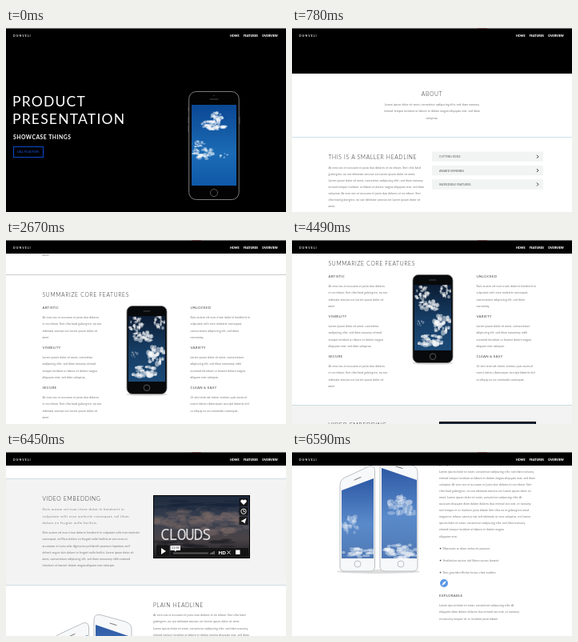
An HTML page for the animation above (8000 ms loop, 350 by 230 pixels).

```html
<!DOCTYPE html>
<html lang="en">
<head>
<meta charset="utf-8">
<title>Product presentation</title>
<style>
html, body { margin: 0; width: 100%; height: 100%; overflow: hidden; background: #fff; }
svg { display: block; width: 350px; height: 230px; }
text { font-family: Lato, "Open Sans", sans-serif; white-space: pre; }
.hero { font-size: 17.5px; letter-spacing: 1.2px; fill: #fff; }
.sub { font-size: 6.8px; font-weight: 700; letter-spacing: .5px; fill: #fff; }
.cta { font-size: 3.4px; fill: #1a5cff; }
.h2 { font-size: 6.8px; font-weight: 300; letter-spacing: .66px; fill: #222; }
.h3 { font-size: 4.4px; letter-spacing: .24px; fill: #444; }
.body { font-size: 3.5px; letter-spacing: .09px; fill: #777; }
.lead { font-size: 4.3px; letter-spacing: .34px; fill: #888; }
.item { font-size: 3.5px; letter-spacing: .1px; fill: #555; }
.mid { text-anchor: middle; }
.nav { font-size: 3.7px; font-weight: 900; fill: #fff; }
.brand { font-size: 3.6px; font-weight: 700; letter-spacing: 1px; fill: #eee; }
.title { font: 300 19.6px "Noto Sans Mono", "DejaVu Sans Mono", monospace; letter-spacing: -1.4px; fill: #ddd; }
.tiny { font-size: 3.6px; fill: #333; }
.hd { font-size: 6px; font-weight: 900; fill: #fff; }

/* the page jumps one screenful at a time, in 70 ms steps */
#page { animation: scroll 8s step-end infinite; }
@keyframes scroll {
  0% { transform: translateY(0); }
  6.25% { transform: translateY(-24px); }
  7.125% { transform: translateY(-150px); }
  8% { transform: translateY(-204px); }
  31.625% { transform: translateY(-230px); }
  32.5% { transform: translateY(-358px); }
  33.375% { transform: translateY(-408px); }
  56.125% { transform: translateY(-447px); }
  57% { transform: translateY(-570px); }
  57.875% { transform: translateY(-612px); }
  80.625% { transform: translateY(-620px); }
  81.5% { transform: translateY(-752px); }
  82.375%, 100% { transform: translateY(-816px); }
}
#tick { animation: tick 8s step-end infinite; }
@keyframes tick { 0% { opacity: 0; } 8%, 100% { opacity: 1; } }
</style>
</head>
<body>
<svg viewBox="0 0 350 230">
  <defs>
    <linearGradient id="sky" x2="0" y2="1"><stop stop-color="#0b4793"/><stop offset=".6" stop-color="#1c6bb5"/><stop offset="1" stop-color="#0f59a8"/></linearGradient>
    <linearGradient id="deep" x2="0" y2="1"><stop stop-color="#0b1c33"/><stop offset=".5" stop-color="#163c63"/><stop offset="1" stop-color="#1b4a78"/></linearGradient>
    <linearGradient id="day" x2="0" y2="1"><stop stop-color="#2c58a4"/><stop offset=".55" stop-color="#5a8aca"/><stop offset="1" stop-color="#4f78b4"/></linearGradient>
    <linearGradient id="dusk" x2="0" y2="1"><stop stop-color="#1d2a3d"/><stop offset=".4" stop-color="#3a4152"/><stop offset=".7" stop-color="#4a4345"/><stop offset="1" stop-color="#1b1c22"/></linearGradient>
    <filter id="soft" x="-20%" y="-20%" width="140%" height="140%"><feGaussianBlur stdDeviation=".5"/></filter>
    <clipPath id="c1"><rect x="232" y="96" width="56" height="101"/></clipPath>
    <clipPath id="c2"><rect x="153" y="503" width="46" height="82"/></clipPath>
    <clipPath id="c3"><path d="M62 864L102 849V949H62Z"/></clipPath>
    <clipPath id="c4"><path d="M112 836L156 851V949H112Z"/></clipPath>
    <clipPath id="c5"><rect x="185" y="675" width="119" height="77"/></clipPath>
  </defs>
  <rect width="350" height="230" fill="#fff"/>

  <g id="page">
    <rect width="350" height="261"/>
    <rect x="9.5" y="148.500" width="37" height="13" fill="none" stroke="#0d49cc"/>

    <rect x="228.7" y="79.5" width="62.5" height="135" rx="9" fill="#030303" stroke="#8a8a8a" stroke-width=".9"/>
    <path d="M228 99v5M228 111v8M228 122v8M292 111v9" stroke="#777" stroke-width=".7"/>
    <path d="M255 89h10" stroke="#444" stroke-linecap="round"/>
    <circle cx="260" cy="84.500" r=".7" fill="#444"/>
    <circle cx="260" cy="206" r="4.600" fill="none" stroke="#777" stroke-width=".7"/>
    <g clip-path="url(#c1)"><rect x="232" y="96" width="56" height="101" fill="url(#sky)"/><g id="clouds1" filter="url(#soft)"/></g>

    <rect y="340" width="350" height="1" fill="#cfe0ea"/>
    <rect y="451" width="350" height="1" fill="#ccc"/>
    <g id="items"/>

    <ellipse cx="176" cy="601" rx="26" ry="2" fill="#ddd" filter="url(#soft)"/>
    <rect x="151" y="490.500" width="50" height="110" rx="7" fill="#08090b" stroke="#777" stroke-width=".8"/>
    <path d="M172 497h8" stroke="#444" stroke-linecap="round"/>
    <circle cx="176" cy="592.700" r="3.800" fill="none" stroke="#777" stroke-width=".7"/>
    <g clip-path="url(#c2)"><rect x="153" y="503" width="46" height="82" fill="url(#deep)"/><g id="clouds2" filter="url(#soft)"/></g>

    <rect y="653" width="350" height="134" fill="#f3f3f3"/>
    <g fill="#cddde4"><rect y="653" width="350" height="1"/><rect y="786" width="350" height="1"/></g>

    <rect x="184" y="674" width="121" height="79"/>
    <g clip-path="url(#c5)"><rect x="185" y="675" width="119" height="77" fill="url(#dusk)"/><g id="clouds5" filter="url(#soft)"/></g>
    <g fill="#111" fill-opacity=".85">
      <rect x="291.500" y="677.500" width="11" height="10.500" rx="1"/><rect x="291.500" y="689" width="11" height="10.500" rx="1"/><rect x="291.500" y="700.500" width="11" height="10.500" rx="1"/>
      <rect x="188" y="736.500" width="16" height="14" rx="1"/><rect x="205.500" y="740" width="97.500" height="10.500" rx="1"/>
    </g>
    <g fill="#fff">
      <path d="M297 686l-3.500-3.500a1.900 1.900 0 0 1 3.500-2a1.900 1.900 0 0 1 3.500 2z"/>
      <path d="M293.500 706.500l7-4-2 7-2-2z"/>
      <path d="M194 740l6 4-6 4z"/>
      <rect x="205.500" y="737" width="12.500" height="6"/>
      <path d="M210.500 743h2.500l-1.200 1.500z"/>
      <rect x="287" y="742.500" width="5.500" height="5.500"/>
    </g>
    <g fill="none" stroke="#fff" stroke-width=".9">
      <circle cx="297" cy="694.200" r="3.200"/><path d="M297 692v2.400h1.700"/>
      <path d="M276.500 743.500l4 4M280.500 743.500l-4 4"/>
    </g>
    <path d="M209 746.500h44" stroke="#555" stroke-width="2"/>
    <path d="M256 748v-2M258 748v-3M260 748v-4" stroke="#aaa"/>

    <ellipse cx="108" cy="965.500" rx="52" ry="2.500" fill="#ddd" filter="url(#soft)"/>
    <g fill="#f7f8f9" stroke="#b5b8bd" stroke-width=".9">
      <path d="M110 830Q110 822 118 823.500L149 832Q157 835 157 841V959Q157 965 151 965H116Q110 965 110 959Z"/>
      <path d="M60 857Q60 852 64 849L96 834Q103 832 103.500 839V959Q103.500 965 98 965H66Q60 965 60 959Z"/>
      <circle cx="136" cy="956" r="4"/><circle cx="82" cy="956" r="4"/>
    </g>
    <path d="M130 834l8 2.500M78 851l8-3.500" stroke="#777" stroke-linecap="round"/>
    <g clip-path="url(#c3)"><rect x="62" y="848" width="40" height="104" fill="url(#day)"/><g id="clouds3" filter="url(#soft)"/></g>
    <g clip-path="url(#c4)"><rect x="112" y="834" width="44" height="116" fill="url(#day)"/><g id="clouds4" filter="url(#soft)"/></g>

    <circle cx="190" cy="980" r="5" fill="#5a97e8"/>
    <path d="M193 977l-2 4-4 2 2-4z" fill="#fff"/>
    <g id="copy"/>
  </g>

  <rect width="350" height="17"/>
  <rect width="350" height="1" fill="#777"/>
  <rect id="tick" x="232" width="12" height="1" fill="#704a4e"/>
  <g id="menu"/>
</svg>
<script>
const NS = "http://www.w3.org/2000/svg";
const $ = id => document.getElementById(id);

function add(parent, tag, attrs, content = "") {
  const el = document.createElementNS(NS, tag);
  for (const k in attrs) el.setAttribute(k, attrs[k]);
  el.textContent = content;
  parent.append(el);
}

const copy = $("copy"), menu = $("menu");
const write = (x, y, cls, s, parent = copy) => add(parent, "text", { x, y, class: cls }, s);
const lines = (x, y, cls, s, step = 8.1) =>
  s.split("|").forEach((line, i) => write(x, y + i * step, cls, line));

// seeded puffs scattered around a centre
function cloud(id, x, y, w, h, n, fill = "#fff", opacity = .5) {
  let seed = Math.round(x * 31 + y * 17);
  const rnd = () => (seed = (seed * 16807 + 11) % 2147483647) / 2147483647;
  rnd();
  for (let i = 0; i < n; i++) {
    const a = rnd() * 2 * Math.PI, d = Math.sqrt(rnd()) / 2;
    add($(id), "ellipse", {
      cx: x + Math.cos(a) * d * w, cy: y + Math.sin(a) * d * h,
      rx: w * (.05 + rnd() * .09), ry: h * (.06 + rnd() * .1), fill, opacity
    });
  }
}

cloud("clouds1", 257, 122, 34, 12, 44);
cloud("clouds1", 263, 113, 17, 15, 36);
cloud("clouds1", 240, 145, 17, 8, 24, "#fff", .4);
cloud("clouds1", 246, 157, 28, 14, 40, "#fff", .4);
cloud("clouds1", 272, 160, 11, 6, 14, "#fff", .4);

cloud("clouds2", 162, 513, 18, 17, 30);
cloud("clouds2", 172, 528, 24, 16, 34);
cloud("clouds2", 192, 511, 13, 18, 24);
cloud("clouds2", 188, 552, 22, 24, 40);
cloud("clouds2", 172, 573, 32, 16, 36);
cloud("clouds2", 160, 550, 10, 9, 12, "#fff", .3);

cloud("clouds3", 84, 941, 40, 12, 30, "#fff", .4);
cloud("clouds3", 74, 906, 26, 22, 24, "#fff", .25);
cloud("clouds4", 136, 940, 46, 18, 40, "#fff", .4);
cloud("clouds4", 138, 884, 36, 28, 30, "#fff", .3);

cloud("clouds5", 220, 702, 74, 26, 44, "#7d6a64", .28);
cloud("clouds5", 272, 710, 64, 28, 44, "#86706a", .28);
cloud("clouds5", 240, 686, 116, 14, 30, "#16233a", .4);
cloud("clouds5", 240, 732, 110, 16, 24, "#1b1c24", .45);

write(9, 11, "brand", "DUNVELI", menu);
write(280, 10.6, "nav", "HOME", menu);
write(296.7, 10.6, "nav", "FEATURES", menu);
write(320, 10.6, "nav", "OVERVIEW", menu);

lines(8, 98, "hero", "PRODUCT|PRESENTATION", 21.7);
write(9, 139.3, "sub", "SHOWCASE THINGS");
write(14, 156.3, "cta", "CALL TO ACTION");

const lorem = "Lorem ipsum dolor sit amet, consetetur sadipscing elitr, sed diam nonumy|eirmod tempor invidunt ut labore et dolore magna aliquyam erat, sed diam|voluptua.";
const vero = "At vero eos et accusam et justo duo dolores et ea rebum. Stet";
const clita = "clita kasd gubergren, no sea takimata sanctus est Lorem ipsum dolor sit|";
const intro = vero + " clita kasd|gubergren, no sea takimata sanctus est Lorem ipsum dolor sit amet.|" + lorem + " " + vero + "|" + clita;

write(175, 289, "h2 mid", "ABOUT");
lines(175, 301.3, "body mid", lorem);

write(45.5, 367.6, "h2", "THIS IS A SMALLER HEADLINE");
lines(45.5, 379.6, "body", intro + "amet.");
["CUTTING EDGE", "AWARD WINNING", "INCREDIBLE FEATURES"].forEach((s, i) => {
  const y = 358.5 + i * 17.3;
  add($("items"), "rect", { x: 175, y, width: 139, height: 12.6, fill: "#f2f4f4" });
  add($("items"), "path", { d: `M306 ${y + 4.3}l2 2-2 2`, fill: "none", stroke: "#222", "stroke-width": .9 });
  write(184, y + 7.7, "item", s);
});

write(45.5, 478.6, "h2", "SUMMARIZE CORE FEATURES");
const artistic = "At vero eos et accusam et justo duo dolores|et ea rebum. Stet clita kasd gubergren, no sea|takimata sanctus est Lorem ipsum dolor sit|amet";
[
  [45.5, 0, "ARTISTIC", artistic],
  [45.5, 1, "VISIBILITY", "Lorem ipsum dolor sit amet, consetetur|sadipscing elitr, sed diam nonumy eirmod|tempor invidunt ut labore et dolore magna|aliquyam erat, sed diam voluptua."],
  [45.5, 2, "SECURE", artistic],
  [230.5, 0, "UNLOCKED", "Duis autem vel eum iriure dolor in hendrerit in|vulputate velit esse molestie consequat,|consectetuer adipiscing elit, sed diam|nonummy."],
  [230.5, 1, "VARIETY", "Lorem ipsum dolor sit amet, consectetuer|adipiscing elit, sed diam nonummy nibh|euismod tincidunt ut laoreet dolore magna|aliquam erat volutpat."],
  [230.5, 2, "CLEAN & EASY", "Ut wisi enim ad minim veniam, quis nostrud|exerci tation ullamcorper suscipit lobortis nisl|ut aliquip ex ea commodo consequat."]
].forEach(([x, row, head, s]) => {
  const y = 493.6 + row * 50;
  write(x, y, "h3", head);
  lines(x, y + 12.7, "body", s);
});

write(45.5, 680.6, "h2", "VIDEO EMBEDDING");
lines(45.5, 693.3, "lead", "Duis autem vel eum iriure dolor in hendrerit in|vulputate velit esse molestie consequat, vel illum|dolore eu feugiat nulla facilisis.", 8.5);
lines(45.5, 722.3, "body", "Duis autem vel eum iriure dolor in hendrerit in vulputate velit esse molestie|consequat, vel illum dolore eu feugiat nulla facilisis at vero eros et|accumsan et iusto odio dignissim qui blandit praesent luptatum zzril|delenit augue duis dolore te feugait nulla facilisi. Lorem ipsum dolor sit|amet, consectetuer adipiscing elit, sed diam nonummy nibh euismod|tincidunt ut laoreet dolore magna aliquam erat volutpat.");
write(193, 730, "title", "CLOUDS");
write(207.2, 741.4, "tiny", "01:58");
write(265.5, 747.6, "hd", "HD");

write(184, 813.6, "h2", "PLAIN HEADLINE");
lines(184, 825.3, "body", intro + "amet. Lorem ipsum dolor sit amet, consetetur sadipscing elitr, At|accusam aliquyam diam dolore dolores duo eirmod eos erat, et nonumy|sed tempor et et invidunt justo labore Stet clita ea et gubergren, kasd|magna no rebum. sanctus sea sed takimata ut vero voluptua. est Lorem|ipsum dolor sit amet, consetetur sadipscing elitr, sed diam nonumy|eirmod tempor invidunt ut labore et dolore magna|aliquyam erat.");
["Maecenas ac diam varius mi posuere", "Vestibulum auctor nisl libero cursus laoreet", "Duis gravida efficitur lectus vitae sodales"].forEach((s, i) => {
  const y = 937.7 + i * 15;
  add(copy, "circle", { cx: 185.5, cy: y - 1.1, r: .8, fill: "#333" });
  write(188.5, y, "body", s);
});
write(184, 996.6, "h3", "EXPLORABLE");
lines(184, 1009.3, "body", "Lorem ipsum dolor sit amet, consetetur sadipscing elitr, At|aliquyam diam dolore dolores duo eirmod eos erat, et nonumy|et nonumy tempor sit et invidunt justo labore");
</script>
</body>
</html>
```
